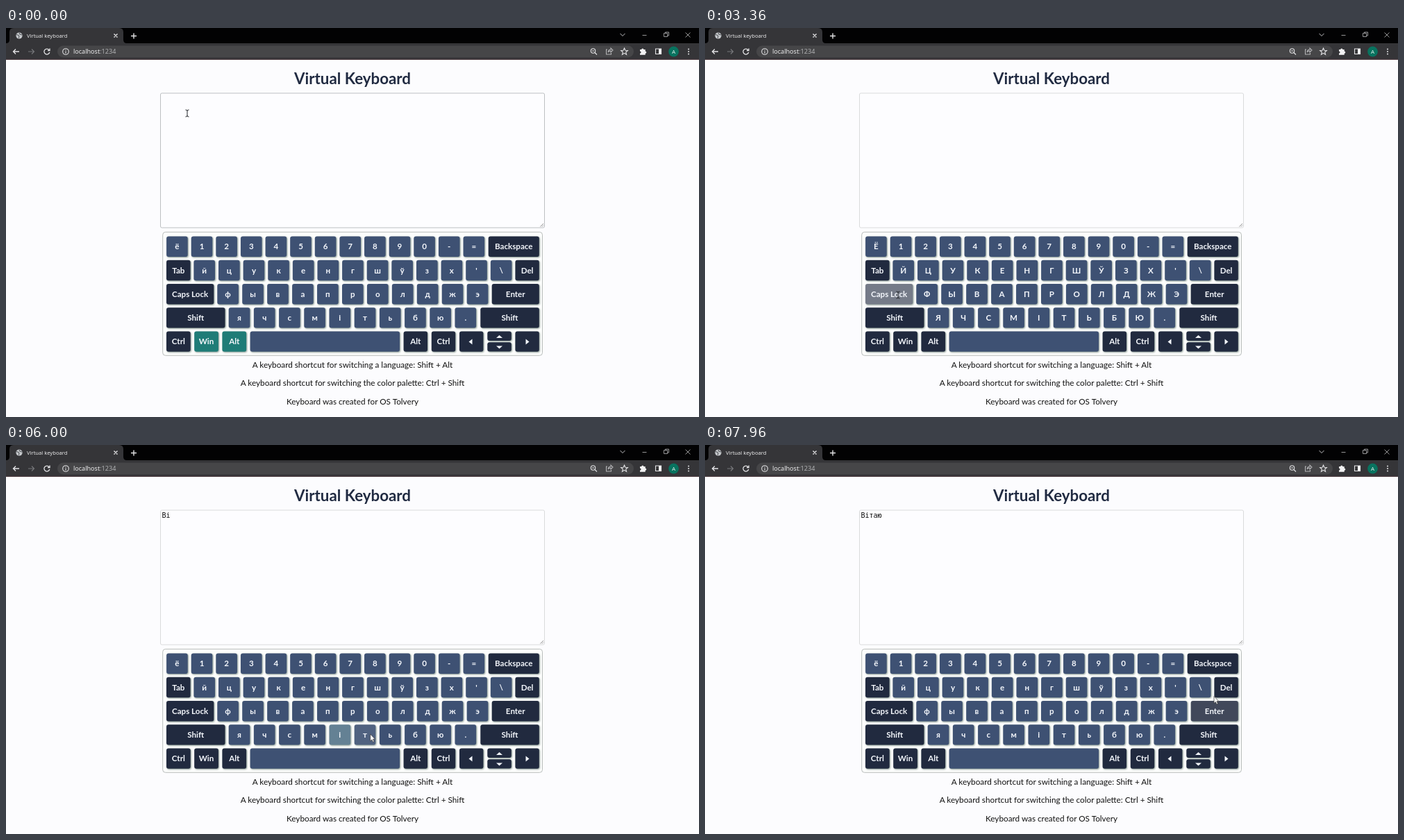
These frames come from a looping animation (998x561 px, 8 s). An HTML page:

```html
<!DOCTYPE html>
<html lang="en">
<head>
<meta charset="utf-8">
<title>Virtual keyboard</title>
<style>
  html, body { margin: 0; width: 100%; height: 100%; overflow: hidden; background: #fcfcfe; }
  svg { display: block; width: 100%; height: 100%; }
  text { font-family: Lato, Carlito, "Open Sans", sans-serif; }
  .ui { font-family: "Open Sans", "Noto Sans", sans-serif; }
  .label { font-size: 11.6px; font-weight: 700; fill: #f3f6fb; text-anchor: middle; }
  .hint { font-size: 11.75px; fill: #111; text-anchor: middle; }
  .typed { font-family: "DejaVu Sans Mono", "Noto Sans Mono", monospace; font-size: 10px; fill: #111; }
  .icon { fill: none; stroke: #e4e4e6; stroke-width: 1.1; }
  #keys { filter: drop-shadow(1.5px 1.5px .8px #86978f); }
</style>
</head>
<body>
<svg viewBox="0 0 998 561" xmlns="http://www.w3.org/2000/svg">
  <rect width="998" height="561" fill="#fcfcfe"/>

  <g id="browser">
    <rect width="998" height="23" fill="#020203"/>
    <path d="M0 22q5 0 5-5V6q0-6 6-6H163q6 0 6 6V17q0 5 5 5H998V45.500H0Z" fill="#353538"/>
    <path d="M0 45.300H998" stroke="#4b363b"/>
    <rect x="74" y="25.500" width="830" height="17" rx="8.500" fill="#464648"/>
    <circle cx="19" cy="11" r="4.600" fill="#c4c7ca"/>
    <path d="M15 9.500l3 1 1 2-1 2M19 7l1 2 3 1" fill="none" stroke="#54575b" stroke-width="1.100"/>
    <text class="ui" x="30" y="13.800" font-size="7.700" fill="#f1f1f2">Virtual keyboard</text>
    <text class="ui" x="97" y="37.200" font-size="9.100" fill="#f8f8f9">localhost<tspan fill="#b8b9bb">:1234</tspan></text>
    <g class="icon">
      <path d="M155.500 8.500l5 5m0-5l-5 5M180 11.500h8m-4-4v8" stroke-width="1.400"/>
      <path d="M19 34H10.500m3.500-3.500L10.500 34l3.500 3.500" stroke-width="1.300"/>
      <path d="M32 34h8.500m-3.500-3.500l3.500 3.500-3.500 3.500" stroke="#77787b"/>
      <path d="M62 31.500a4 4 0 1 0 .8 3.500M63 29.500v3h-3" stroke-width="1.300"/>
      <circle cx="86" cy="34" r="4.300"/><path d="M86 33.500v3m0-5v1"/>
      <path d="M884.500 8l3.500 3.500 3.500-3.500" stroke="#77777a"/>
      <path d="M916.500 10.500h6M978.500 6.500l7 7m0-7l-7 7M947.500 7.500h5v5h-5zM949.500 7.500v-1.500h5v5h-2" stroke="#a6a6a8" stroke-width=".9"/>
      <circle cx="845.500" cy="33" r="3.200"/><path d="M848 35.500l3 3M844 33h3"/>
      <path d="M866 31h-1.500v7h7v-2M867 35q.5-4 4-4v-2l3 3-3 3v-2q-3 0-4 2z" stroke="#b4b4b6"/>
      <path d="M890.500 29l1.400 3.200 3.500.3-2.700 2.300.9 3.400-3.100-1.900-3.100 1.900.9-3.400-2.700-2.300 3.500-.3z"/>
      <path d="M935.500 30h8v7.500h-8z"/>
    </g>
    <path d="M913 31h2.200a1.600 1.600 0 0 1 3.200 0h2.300v2.500a1.600 1.600 0 0 1 0 3.200v2.100H913v-2.400a1.500 1.500 0 0 0 0-3zM940 30h3.500v7.500H940z" fill="#f2f2f3"/>
    <circle cx="961.500" cy="34" r="7.400" fill="#08735f"/>
    <text class="ui" x="961.500" y="36.800" font-size="8" fill="#eaf4f1" text-anchor="middle">A</text>
    <g fill="#e4e4e6"><circle cx="983" cy="30.500" r="1"/><circle cx="983" cy="34" r="1"/><circle cx="983" cy="37.500" r="1"/></g>
  </g>

  <text x="499" y="81.300" font-size="22.300" font-weight="700" fill="#212b42" text-anchor="middle">Virtual Keyboard</text>
  <rect id="area" x="222.500" y="94" width="553" height="194" rx="2" fill="#fdfdff" stroke-width=".9"/>
  <path d="M769.500 286.500l4.500-4.500m-2 4.500l2-2" stroke="#777" stroke-width=".8"/>
  <text id="typed" class="typed" x="224.500" y="105.200"></text>
  <rect x="225.700" y="294.300" width="546.800" height="178" rx="4" fill="#fcfdfc" stroke="#b2b6b5" stroke-width=".9"/>
  <g id="keys"></g>
  <g id="labels"></g>
  <text class="hint" x="499" y="490">A keyboard shortcut for switching a language: Shift + Alt</text>
  <text class="hint" x="499" y="516.300">A keyboard shortcut for switching the color palette: Ctrl + Shift</text>
  <text class="hint" x="499" y="542.500">Keyboard was created for OS Tolvery</text>

  <path id="arrow" d="M0 0V10l2.300-2.100 1.600 3.500 1.700-.8-1.600-3.400H7z" fill="#fff" stroke="#333" stroke-width=".7"/>
  <path id="beam" d="M-2.500-5q2.500 0 2.500 1.500q0-1.500 2.500-1.500M0-4V4M-2.500 5q2.500 0 2.500-1.500q0 1.500 2.500 1.500" fill="none" stroke="#25282c"/>
</svg>
<script>
const LOOP = 8000, FADE = 160, STEPS = 16;
const LETTER = [62, 81, 115], DARK = [33, 42, 63], TEAL = [31, 124, 119], WHITE = [255, 255, 255];
const CAPS_ON = 2540, CAPS_OFF = 5030;
const $ = id => document.getElementById(id);
const keys = [];

function add(parent, tag, attrs) {
  const el = document.createElementNS('http://www.w3.org/2000/svg', tag);
  for (const name in attrs) el.setAttribute(name, attrs[name]);
  return parent.appendChild(el);
}

function addKey(label, x, y, w, base, h = 29.4) {
  const key = { label, x, y, w, h, base, cx: x + w / 2, cy: y + h / 2 };
  key.rect = add($('keys'), 'rect', { x, y, width: w, height: h, rx: 3 });
  key.text = add($('labels'), 'text', { class: 'label', x: key.cx, y: key.cy + 4 });
  keys.push(key);
  return key;
}

const rowY = row => 300.6 + row * 34.2;
function addLetters(chars, row, center, pitch) {
  [...chars].forEach((c, i) => addKey(c, center + i * pitch - 15.3, rowY(row), 30.6, LETTER));
}
function addDark(label, x, row, right) {
  return addKey(label, x, rowY(row), right - x, DARK);
}

addLetters('ё1234567890-=', 0, 246.4, 35.62);
addDark('Backspace', 694.7, 0, 767.8);
addDark('Tab', 231, 1, 265.6);
addLetters("йцукенгшўзх'\\", 1, 285.7, 35.62);
addDark('Del', 733.4, 1, 767.8);
addDark('Caps Lock', 231, 2, 299.3);
addLetters('фывапролджэ', 2, 319.6, 35.94);
addDark('Enter', 699.7, 2, 767.8);
addDark('Shift', 231, 3, 315.5);
addLetters('ячсмітьбю.', 3, 336, 36.2);
addDark('Shift', 683.3, 3, 767.8);
['Ctrl', 'Win', 'Alt'].forEach((s, i) => addDark(s, 231 + i * 40.2, 4, 265.7 + i * 40.2));
addKey('', 351.6, rowY(4), 215.4, LETTER);
['Alt', 'Ctrl', ''].forEach((s, i) => addDark(s, 572.6 + i * 40.2, 4, 607 + i * 40.2));
addKey('', 693.3, 437.6, 34.5, DARK, 13.4);
addKey('', 693.3, 453.2, 34.5, DARK, 13.4);
addDark('', 733.4, 4, 767.8);
add($('labels'), 'path', {
  d: 'M671.5 448.500v8l-5-4zM748.500 448.500v8l5-4zM706 447h9l-4.500-4zM706 458.500h9l-4.500 4z', fill: '#f3f6fb'
});

// Pointer stops: time, x, y
const path = [
  [0, 261, 123], [300, 261, 123], [830, 335, 285], [1300, 387, 406], [1630, 471, 402],
  [1700, 471, 402], [2280, 278, 385], [3360, 278, 385], [3800, 392, 384], [4200, 392, 386],
  [4700, 287, 388], [5130, 287, 388], [5600, 482, 419], [5930, 482, 419], [6000, 524.6, 417],
  [6230, 520, 419], [6600, 428, 386], [6760, 428, 386], [7190, 632.5, 421], [7530, 632.5, 421],
  [7740, 722, 385], [7930, 733, 362.5]
];
// Clicks: time, key, typed character
const clicks = [
  [2500, 'Caps Lock', ''], [4000, 'в', 'В'], [5020, 'Caps Lock', ''], [5690, 'і', 'і'],
  [6150, 'т', 'т'], [6720, 'а', 'а'], [7380, 'ю', 'ю']
];

const clamp = v => Math.max(0, Math.min(1, v));
const mix = (a, b, k) => a.map((v, i) => v + (b[i] - v) * k);

function pointer(t) {
  const i = path.findIndex(p => p[0] > t);
  if (i < 0) return path[path.length - 1].slice(1);
  if (i === 0) return path[0].slice(1);
  const [a, b] = [path[i - 1], path[i]];
  const k = clamp((t - a[0]) / (b[0] - a[0])), e = k * k * (3 - 2 * k);
  return [a[1] + (b[1] - a[1]) * e, a[2] + (b[2] - a[2]) * e];
}

const inside = (k, [x, y]) => x >= k.x && x <= k.x + k.w && y >= k.y && y <= k.y + k.h;
const onLabel = (k, [x, y]) => k.label &&
  Math.abs(x - k.cx) < k.label.length * 3.2 + 4.05 && Math.abs(y - k.cy) < 7;

function pressed(key, t) {
  if (key.x < 330 && (key.label === 'Win' || key.label === 'Alt')) return clamp((380 - t) / 150);
  let level = 0;
  for (const [at, label] of clicks) {
    if (label !== key.label || t < at) continue;
    const hold = label === 'Caps Lock' && at < 3000 ? 40 : 150;
    level = Math.max(level, clamp(1 - (t - at - hold) / (hold * 1.4)));
  }
  return level;
}

function render(t) {
  const pos = pointer(t), caps = t >= CAPS_ON && t < CAPS_OFF;
  const trail = Array.from({ length: STEPS }, (_, i) => pointer(t - i * FADE / STEPS));
  for (const key of keys) {
    const hover = trail.filter(p => inside(key, p)).length / STEPS;
    const press = pressed(key, t);
    const color = mix(mix(key.base, TEAL, press), WHITE, hover * (.38 - .2 * press));
    key.rect.setAttribute('fill', `rgb(${color.map(Math.round)})`);
    const label = caps && key.label.length === 1 ? key.label.toUpperCase() : key.label;
    if (key.text.textContent !== label) key.text.textContent = label;
  }
  $('typed').textContent = clicks.filter(c => c[0] <= t).map(c => c[2]).join('');
  const overArea = pos[0] > 222 && pos[0] < 776 && pos[1] > 94 && pos[1] < 288;
  $('area').setAttribute('stroke', overArea ? '#b5b8bc' : '#d6d7d9');
  const beam = overArea || keys.some(k => onLabel(k, pos));
  for (const [id, on] of [['arrow', !beam], ['beam', beam]]) {
    $(id).setAttribute('transform', `translate(${pos})`);
    $(id).setAttribute('visibility', on ? 'visible' : 'hidden');
  }
}

let start;
function tick(now) {
  start ??= now;
  render((now - start) % LOOP);
  requestAnimationFrame(tick);
}
render(0);
requestAnimationFrame(tick);
</script>
</body>
</html>
```
